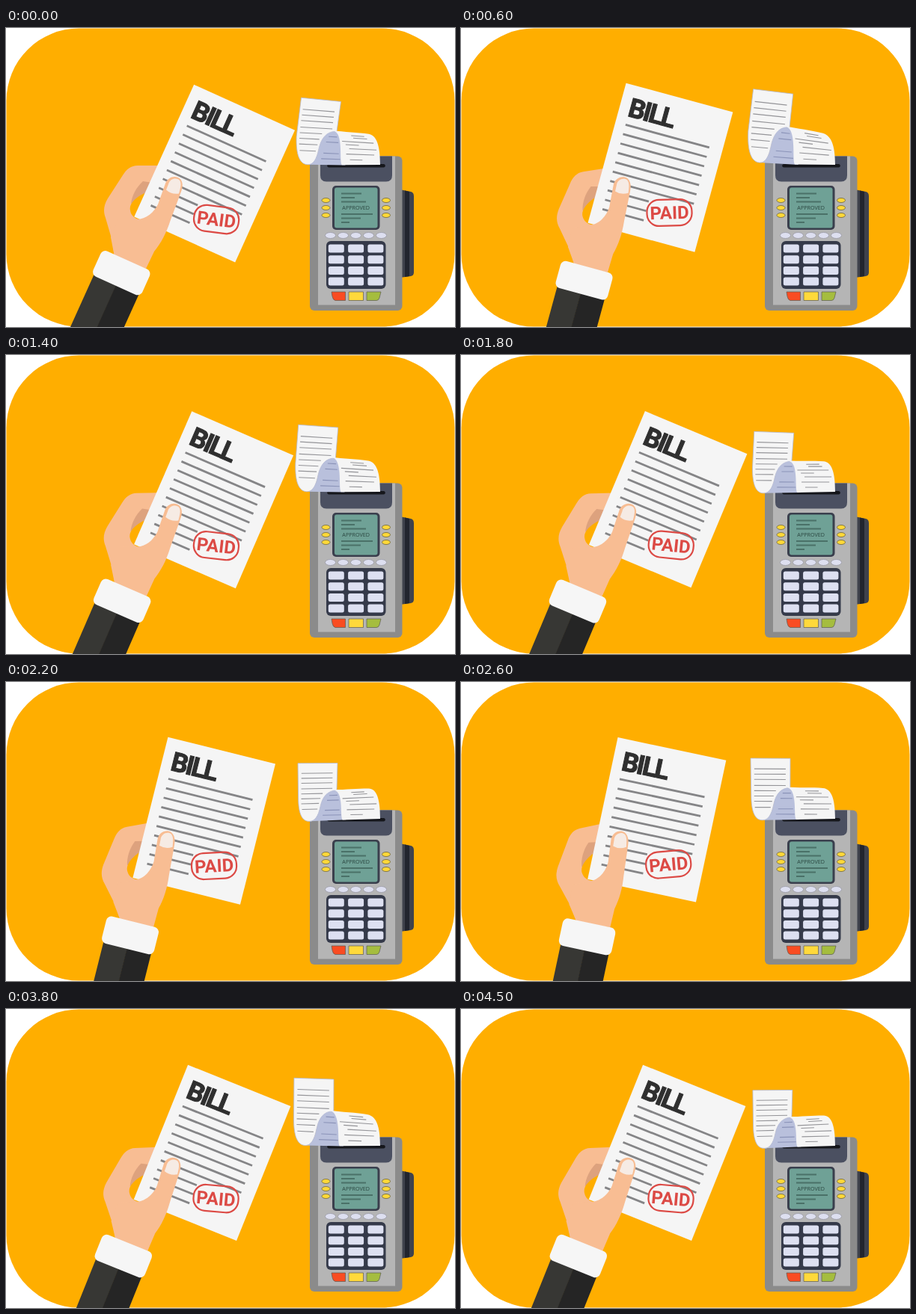
An HTML page for the animation above (5000 ms loop, 600 by 400 pixels).

```html
<!DOCTYPE html>
<html lang="en">
<head>
<meta charset="utf-8">
<title>Paid bill</title>
<style>
  html, body { margin: 0; width: 100%; height: 100%; overflow: hidden; background: #fff; }
  svg { display: block; width: 600px; height: 400px; }
  text { font-family: Roboto, Arial, sans-serif; }
  .paper { fill: #f5f5f5; }
  .skin { fill: #f8bd93; }
  .fold { fill: #b9c0dc; }
  .ink { fill: none; stroke: #949498; stroke-width: 1.1; }
  .foldInk { fill: none; stroke: #8b93b8; stroke-width: 1.1; }
</style>
</head>
<body>
<svg viewBox="0 0 600 400">
  <rect x="0.5" y="0.5" width="599" height="399" rx="97" fill="#ffae00"/>

  <g id="hand">
    <path class="skin" d="M218 184H176C167 184 161 189 156 197L136 228C130 238 130 246 133 254L142 285L145 306L185 320L215 240Z"/>
    <path fill="#dda27e" d="M183 205L196 207L184 226L167 235C168 225 174 213 183 205Z"/>
    <path fill="#ffae00" d="M185 221C173 227 164 235 166 244C167 252 175 258 186 257Z"/>

    <g transform="translate(222.5 268) rotate(24.3)">
      <rect class="paper" x="-53" y="-187" width="148" height="194"/>
      <text x="-40.5" y="-145" font-size="35.5" font-weight="700" letter-spacing="-2.5" fill="#2f2f2f" stroke="#2f2f2f" stroke-width="1">BILL</text>
      <path id="rows" stroke="#858587" stroke-width="2.8"/>
      <g transform="translate(48.5 -35) rotate(-17)" fill="#dc4a45">
        <rect x="-30" y="-17.5" width="60" height="35" rx="16" fill="none" stroke="#dc4a45" stroke-width="2.2"/>
        <text y="8.5" font-size="24" font-weight="700" text-anchor="middle">PAID</text>
      </g>
    </g>

    <path class="skin" d="M174 256C188 256 198 246 203 236L213 208C216 199 227 196 233 202C237 207 236 213 234 219L219.500 258C214 275 207 288 198 299L187 322L145 306L140 280L150 256Z"/>
    <path fill="#f6ebe4" d="M214 216.500L217 209C219 201 229 199.500 232.500 204.500C234.500 208.500 233.500 213 231 221.500Q221 223 214 216.500Z"/>

    <g transform="translate(154.300 327.700) rotate(24.300)">
      <rect x="-32.500" y="8" width="33" height="130" fill="#373734"/>
      <rect y="8" width="33" height="130" fill="#252525"/>
      <rect x="-36" y="-18.700" width="72" height="37.400" rx="7" fill="#f6f6f6"/>
    </g>
  </g>

  <g id="terminal">
    <path fill="#3f424c" d="M526 216L541 219Q545 220 545 225V327Q545 331 541 332L526 334Z"/>
    <path fill="#22252e" d="M533 217.500L539 219V332L533 333Z"/>
    <rect x="406" y="171.500" width="123.500" height="206.500" rx="6" fill="#8b8b8b"/>
    <rect x="417" y="171.500" width="103" height="199" fill="#b5b5b5"/>
    <path fill="#4b5061" d="M420 171.500H516V197Q516 205.500 508 205.500H428Q420 205.500 420 197Z"/>
    <path stroke="#15161b" stroke-width="4.500" stroke-linecap="round" d="M431.500 184.300H504.500"/>
    <rect x="436" y="211" width="63.500" height="59" rx="5" fill="#3a3f4d"/>
    <rect x="439" y="213.500" width="57.500" height="54" rx="3" fill="#6fa196"/>
    <path stroke="#4a7168" stroke-width="2" d="M448 221.500H475M448 227H466M448 232.500H481M448 249H490M448 254.500H474M448 260H459"/>
    <text x="467.700" y="242.700" font-size="7.200" text-anchor="middle" fill="#2b4741" style="font-family:'Open Sans',sans-serif">APPROVED</text>
    <g id="buttons"></g>
    <rect x="428" y="285" width="79.500" height="64" rx="6" fill="#353a4a"/>
    <g id="keys" fill="#dde0f1"></g>
    <g stroke="#5b5b52" stroke-width="0.7">
      <path fill="#f94c22" d="M435 353H453.500V364.500H440Q437 364 436 359Z"/>
      <path fill="#ffd93b" d="M458 353H477.500V364.500H458Z"/>
      <path fill="#a5bd3e" d="M482 353H501L499 361Q498 364.500 495 364.500H482Z"/>
    </g>
  </g>

  <g id="receipt">
    <path class="fold" d="M403,185 C413,184 416,173 418,163 C421,148 427,141 434,141 C444,141 450,152 450,165 C450,175 450,183 453,184 Z"/>
    <path class="paper" stroke="#b4bad6" stroke-width="0.8" d="M387,103 L440,103 L440,142 C428,142 421,150 418,164 C415,179 410,185 403,185 C393,185 388,174 388,151 Z"/>
    <path class="paper" d="M433,141 C450,142 470,141 484,142 C495,143 500,156 500,183 L448,184 C445,180 448,160 443,148 C441,143 437,141 433,141 Z"/>
    <path class="ink" d="M392,117 L434,117 M392,124 L434,124 M392,131 L434,131 M392,139 L434,139 M392,146 L421,146 M392,153 L418,153 M392,160 L416,160 M393,168 L414,168"/>
    <path class="ink" d="M460,146 L478,146 M463,149 L482,149 M448,154 L491,154 M453,158 L471,158 M458,163 L495,163 M454,170 L492,170 M459,177 L476,177"/>
    <path class="foldInk" d="M430,149 L441,149 M427,156 L443,156 M424,170 L444,170 M421,177 L446,177"/>
  </g>
</svg>
<script>
const $ = id => document.getElementById(id);

// Bill rows: seven long, three short
$('rows').setAttribute('d', Array.from({ length: 10 }, (_, i) =>
  `M-39 ${-133 + 13 * i}H${i < 7 ? 77 : 18}`).join(''));

const oval = (x, y, rx, ry, fill, edge) =>
  `<ellipse cx="${x}" cy="${y}" rx="${rx}" ry="${ry}" fill="${fill}" stroke="${edge}" stroke-width="0.8"/>`;
let ovals = '';
for (const y of [230.5, 240.5, 250.5])
  for (const x of [427.5, 508]) ovals += oval(x, y, 5.5, 3, '#ffd839', '#6b6338');
for (let i = 0; i < 5; i++) ovals += oval(433.5 + 17 * i, 277.5, 7, 4, '#dddff0', '#9a9aa5');
$('buttons').innerHTML = ovals;

let keys = '';
for (let row = 0; row < 4; row++)
  for (let col = 0; col < 3; col++)
    keys += `<rect x="${430.8 + 26.3 * col}" y="${289.5 + 14.7 * row}" width="21" height="11" rx="2.5"/>`;
$('keys').innerHTML = keys;

// [time, value] keys, joined by a smooth curve
const tilt = [[0, 24.3], [600, 15.25], [800, 13], [1200, 20.5], [1400, 23.45], [1600, 25.8],
  [1800, 22.74], [2450, 11.2], [2600, 12], [3000, 21.3], [3200, 21.9], [4500, 21.9]];
const lift = [[0, 5], [600, 11], [1050, -1], [1400, 5], [1800, 0.3], [2200, -3], [2600, 0.5],
  [2900, 6], [3200, 5], [3500, -2], [3850, 6], [4200, 0], [4500, -3]];
const sway = [[0, 8], [600, 4], [1400, 4], [1800, 5], [2600, 0], [3200, -4],
  [3600, 0], [4050, -5], [4500, 3]];

function curve(pts, t) {
  let i = 0;
  while (i < pts.length - 2 && t >= pts[i + 1][0]) i++;
  const slope = j => {
    if (j < 1 || j > pts.length - 2) return 0;
    const [a, b, c] = pts.slice(j - 1, j + 2);
    const s = (b[1] - a[1]) / (b[0] - a[0]), r = (c[1] - b[1]) / (c[0] - b[0]);
    return s * r > 0 ? 2 * s * r / (s + r) : 0;
  };
  const [t0, v0] = pts[i], [t1, v1] = pts[i + 1];
  const h = t1 - t0, p = (t - t0) / h, q = 1 - p;
  return v0 * (1 + 2 * p) * q * q + v1 * (3 - 2 * p) * p * p
    + h * p * q * (slope(i) * q - slope(i + 1) * p);
}

// Bends a receipt point; the end inside the slot stays put
function bend(x, y, up, side) {
  const u = (500 - x) / 112, v = (183 - y) / 81;
  const dx = -0.6 * up * u * (1 - v * v)
    + side * Math.min(1, 2 * u) * (0.3 * (1 - v) + 0.97 * v * v);
  const dy = -up * (0.65 * u * u + v * (-0.4 + 4.9 * u - 3.2 * u * u))
    + 1.45 * side * v * v * u * (1 - u);
  return `${(x + dx).toFixed(2)},${(y + dy).toFixed(2)}`;
}

const sheets = [...$('receipt').children].map(el => ({ el, d: el.getAttribute('d') }));

function draw(now) {
  const t = Math.min(4500, Math.floor(now % 5000 / 100) * 100);
  $('hand').setAttribute('transform', `rotate(${curve(tilt, t) - 24.3} 222.5 268)`);
  const up = curve(lift, t), side = curve(sway, t);
  for (const { el, d } of sheets)
    el.setAttribute('d', d.replace(/(\d+),(\d+)/g, (_, x, y) => bend(+x, +y, up, side)));
}

const start = performance.now();
function tick() {
  draw(performance.now() - start);
  requestAnimationFrame(tick);
}
tick();
</script>
</body>
</html>
```
